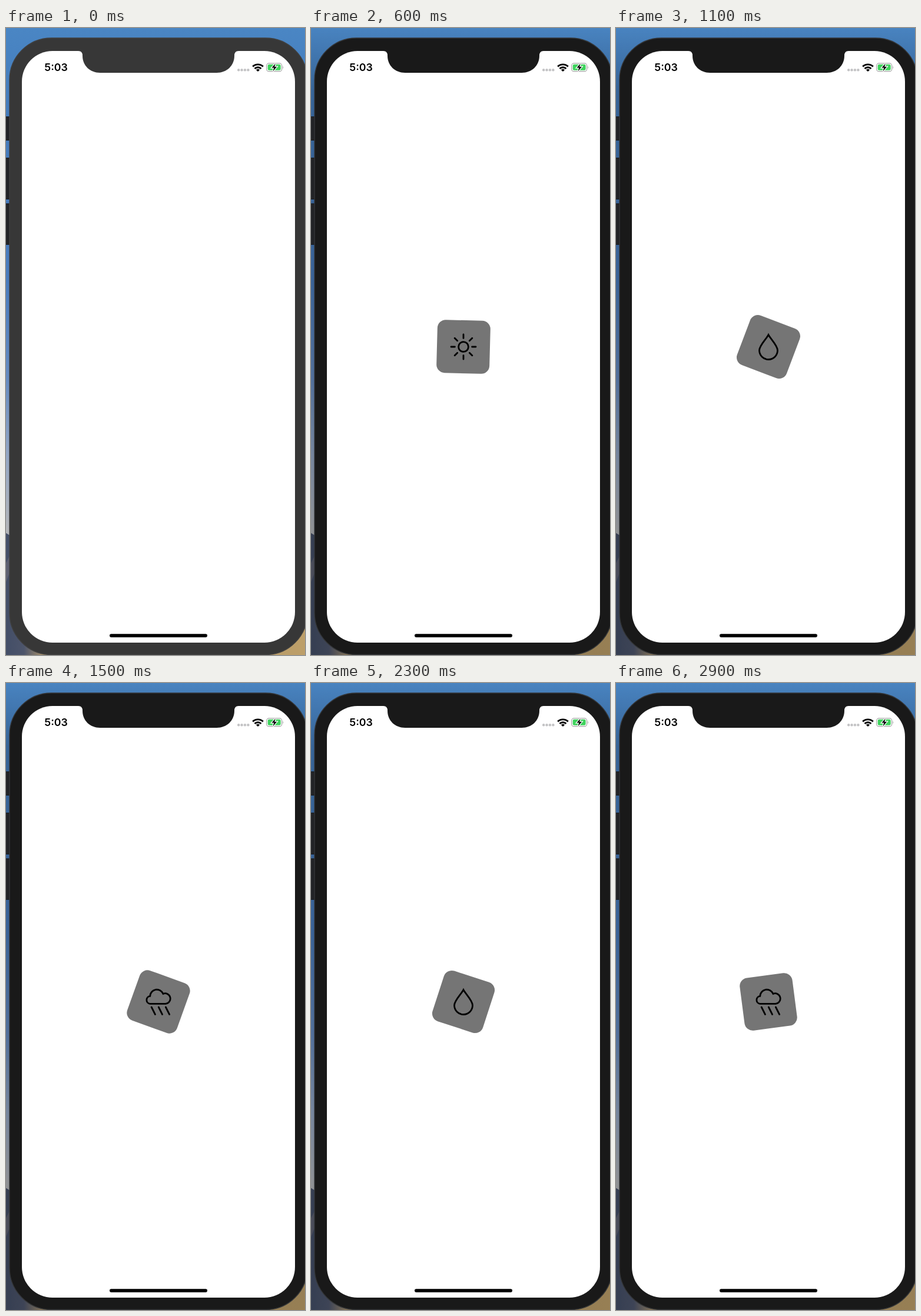
Write an HTML page that moves like this. It is 508 by 1064 pixels and loops after 3000 ms.

```html
<!DOCTYPE html>
<html lang="en">
<head>
<meta charset="utf-8">
<title>Weather loader</title>
<style>
  html, body { margin: 0; width: 100%; height: 100%; overflow: hidden; }
  svg { display: block; width: 100vw; height: 100vh; }
  .icon { fill: none; stroke: #000; stroke-width: 2.8; stroke-linecap: round; }
  .idle { --body: #373737; --edge: #404040; --shade: 0; }
  .active { --body: #191919; --edge: #343638; --shade: .2; }
</style>
</head>
<body>
<svg id="stage" class="idle" viewBox="0 0 508 1064">
  <defs>
    <linearGradient id="sky" x2="0" y2="1">
      <stop offset="0" stop-color="#4a86c4"/>
      <stop offset=".12" stop-color="#447cbc"/>
      <stop offset=".4" stop-color="#487bbd"/>
      <stop offset=".56" stop-color="#668bc0"/>
      <stop offset=".68" stop-color="#93a6c4"/>
      <stop offset=".8" stop-color="#b3b5b9"/>
    </linearGradient>
    <linearGradient id="shade" x2="0" y2="1">
      <stop offset="0" stop-opacity=".1"/>
      <stop offset=".1" stop-opacity="1"/>
    </linearGradient>
    <linearGradient id="ground">
      <stop offset="0" stop-color="#434e67"/>
      <stop offset=".06" stop-color="#4d556b"/>
      <stop offset=".12" stop-color="#a08c6b"/>
      <stop offset="1" stop-color="#bd9f69"/>
    </linearGradient>
  </defs>

  <!-- desktop -->
  <rect width="508" height="1064" fill="url(#sky)"/>
  <path d="M0 857L8 862V1000L508 990V1064H0Z" fill="url(#ground)"/>
  <path d="M0 908L6 896V925L0 940Z" fill="#5d6070"/>
  <rect width="508" height="1064" fill="url(#shade)" opacity="var(--shade)"/>

  <!-- phone -->
  <g fill="#222326" stroke="#111" stroke-width=".8">
    <rect x="-4" y="150.5" width="12" height="40" rx="2"/>
    <rect x="-4" y="220.5" width="12" height="70" rx="2"/>
    <rect x="-4" y="298" width="12" height="69.5" rx="2"/>
  </g>
  <rect x="6" y="17" width="506" height="1046.5" rx="71" fill="var(--body)" stroke="var(--edge)" stroke-width="1.4"/>
  <rect x="27" y="39" width="464" height="1004" rx="52" fill="#fff"/>
  <path d="M121 38V39H123Q130 39 130 47C130 64 143 76 160 76H358C375 76 388 64 388 47Q388 39 395 39H397V38Z" fill="var(--body)"/>

  <!-- status bar -->
  <text x="65.3" y="73.2" font-family="Inter, sans-serif" font-size="17.8" font-weight="600">5:03</text>
  <g fill="#c3c3c5">
    <circle cx="395.2" cy="71.3" r="2.2"/><circle cx="400.6" cy="71.3" r="2.2"/>
    <circle cx="406" cy="71.3" r="2.2"/><circle cx="411.4" cy="71.3" r="2.2"/>
  </g>
  <g fill="none" stroke="#000" stroke-width="2.9">
    <path d="M419.2 65.4A12.7 12.7 0 0 1 436.8 65.4M422.5 69A8 8 0 0 1 433.5 69"/>
  </g>
  <path d="M428 74L424.9 71.1A4.4 4.4 0 0 1 431.1 71.1Z"/>
  <rect x="442.7" y="59.9" width="26" height="13.8" rx="4" fill="#fff" stroke="#a6a6a6" stroke-width="1.2"/>
  <rect x="444.7" y="61.8" width="22" height="10" rx="2.3" fill="#3fd35d"/>
  <path d="M470.4 64.4Q472.4 66.8 470.4 69.2Z" fill="#a6a6a6"/>
  <path d="M457.8 60.3L451.4 67.6H455.2L453.6 73.4L460.2 65.8H456.2Z" stroke="#fff" stroke-width="2.4" paint-order="stroke"/>

  <rect x="176" y="1028.3" width="166" height="5.6" rx="2.8"/>

  <!-- loader -->
  <g id="loader" transform="translate(259 541)">
    <rect id="tile" x="-45" y="-45" width="90" height="90" rx="14" fill="#757575"/>
    <g class="icon"><circle r="8.4"/><path id="rays"/></g>
    <path class="icon" d="M0 -20.3C-3 -14 -15.5 -2.5 -15.5 6A15.5 15.5 0 0 0 15.5 6C15.5 -2.5 3 -14 0 -20.3Z"/>
    <path class="icon" d="M-14.5 3.3A6.5 6.5 0 0 1 -14.3 -9.6A11.6 11.6 0 0 1 8 -13.6A8.8 8.8 0 1 1 12 3.3ZM-11.8 9L-5.6 21.4M.3 9L6.5 21.4M12.4 9L18.6 21.4"/>
  </g>
</svg>
<script>
  const LOOP = 3000, STEP = 100, WAKE = 200, START = 563, TURN = 403;
  const $ = id => document.getElementById(id);
  const icons = [...document.querySelectorAll('.icon')];

  $('rays').setAttribute('d', Array.from({ length: 8 }, (_, i) => {
    const a = i * Math.PI / 4;
    const at = r => `${r * Math.cos(a)} ${r * Math.sin(a)}`;
    return `M${at(14.6)}L${at(21)}`;
  }).join(''));

  // cubic-bezier(.42, 0, .58, 1)
  function ease(x) {
    let lo = 0, hi = 1, u;
    for (let i = 0; i < 24; i++) {
      u = (lo + hi) / 2;
      const v = 1 - u;
      if (1.26 * u * v * v + 1.74 * u * u * v + u ** 3 < x) lo = u; else hi = u;
    }
    return u * u * (3 - 2 * u);
  }

  function draw(t) {
    const turns = (t - START) / TURN;
    const n = Math.floor(turns);
    $('stage').setAttribute('class', t < WAKE ? 'idle' : 'active');
    $('loader').style.display = turns < 0 ? 'none' : '';
    $('tile').setAttribute('transform', `rotate(${90 * ease(turns - n)})`);
    icons.forEach((icon, i) => icon.style.display = i === n % 3 ? '' : 'none');
  }

  const begin = performance.now();
  function tick() {
    const t = (performance.now() - begin) % LOOP;
    draw(Math.floor(t / STEP) * STEP);
    requestAnimationFrame(tick);
  }
  tick();
</script>
</body>
</html>
```
